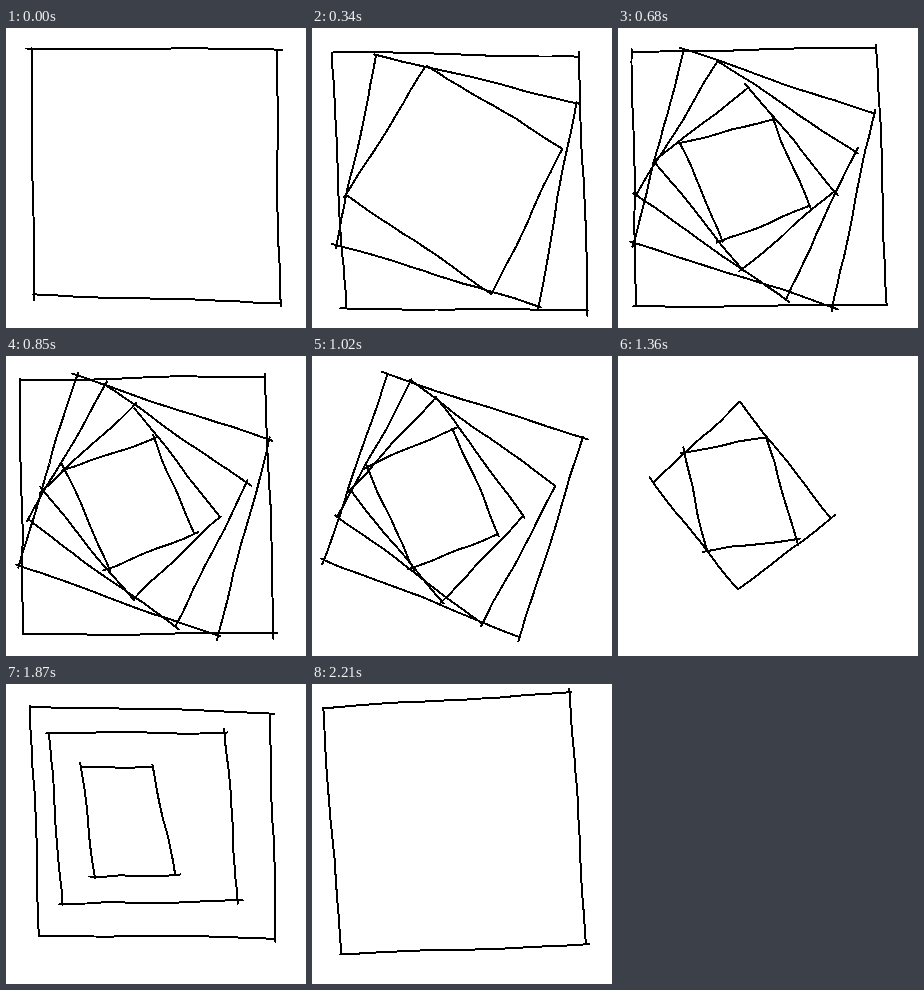
These frames come from a looping animation (300x300 px, 2.38 s). An HTML page:

```html
<!DOCTYPE html>
<html lang="en">
<head>
<meta charset="utf-8">
<title>Nested squares</title>
<style>
  html, body { margin: 0; width: 100%; height: 100%; overflow: hidden; background: #fff; }
  svg { display: block; width: 100%; height: 100%; }
  path { fill: none; stroke: #000; stroke-width: 2; stroke-linecap: round; stroke-linejoin: round; shape-rendering: crispEdges; }
</style>
</head>
<body>
<svg viewBox="0 0 300 300"><path id="ink"/></svg>
<script>
const STEP = 170, STEPS = 14;

// A square lives from its first to its last step. Keys give its corners
// (clockwise from top left) at some steps; the rest is interpolated.
const squares = [
  { first: 0, last: 5, keys: {
    0: [25, 21, 271, 21, 274, 275, 28, 267],
    2: [20, 23, 266, 29, 276, 282, 34, 281],
    4: [14, 25, 259, 20, 268, 277, 18, 279] } },
  { first: 1, last: 6, keys: {
    2: [65, 27, 264, 75, 227, 279, 24, 217],
    4: [66, 21, 256, 86, 215, 279, 15, 215],
    6: [75, 18, 271, 81, 208, 281, 12, 204] } },
  { first: 2, last: 7, keys: {
    2: [114, 38, 250, 120, 180, 266, 34, 167],
    4: [100, 33, 237, 124, 168, 272, 18, 167],
    6: [99, 25, 244, 130, 170, 268, 25, 160] } },
  { first: 3, last: 8, keys: {
    4: [131, 60, 216, 163, 124, 242, 36, 133],
    6: [124, 41, 211, 160, 130, 245, 38, 134],
    8: [122, 46, 213, 162, 120, 233, 35, 126] } },
  { first: 4, last: 11, keys: {
    4: [62, 115, 155, 91, 192, 177, 104, 213],
    6: [55, 111, 141, 74, 186, 178, 101, 211],
    8: [67, 97, 148, 81, 178, 184, 89, 195],
    11: [75, 83, 146, 83, 170, 191, 88, 192] } },
  { first: 10, last: 12, keys: {
    11: [43, 49, 219, 49, 231, 217, 56, 220] } },
  { first: 11, last: 13, keys: {
    11: [24, 23, 263, 29, 270, 254, 33, 252],
    13: [11, 24, 258, 9, 274, 261, 30, 270] } }
];

function randomFrom(seed) {
  return () => {
    seed = (seed * 1664525 + 1013904223) >>> 0;
    return seed / 4294967296;
  };
}

function cornersAt(keys, step) {
  const times = Object.keys(keys).map(Number);
  const before = times.filter(t => t <= step).pop() ?? times[0];
  const after = times.find(t => t >= step) ?? before;
  const mix = after > before ? (step - before) / (after - before) : 0;
  return keys[before].map((v, i) => v + (keys[after][i] - v) * mix);
}

// A pen stroke that slightly over- or undershoots its ends and wavers on the way.
function stroke(x1, y1, x2, y2, random) {
  const length = Math.hypot(x2 - x1, y2 - y1);
  const ux = (x2 - x1) / length, uy = (y2 - y1) / length;
  const from = 2 - random() * 8, to = length - 2 + random() * 8;
  const phase = random() * 2 * Math.PI, bow = random() * 2 - 1;
  const count = Math.ceil(length / 14);
  const points = [];
  for (let i = 0; i <= count; i++) {
    const t = i / count, along = from + (to - from) * t;
    const off = bow * Math.sin(Math.PI * t) + 0.6 * Math.sin(phase + 9 * t) + random() * 0.6 - 0.3;
    points.push((x1 + ux * along - uy * off).toFixed(1) + ',' + (y1 + uy * along + ux * off).toFixed(1));
  }
  return 'M' + points.join(' ');
}

function sketch(step) {
  let path = '';
  squares.forEach(({ first, last, keys }, n) => {
    if (step < first || step > last) return;
    const c = cornersAt(keys, step);
    const random = randomFrom(7919 * (step + 1) + 104729 * (n + 1));
    for (let i = 0; i < 8; i += 2) {
      const j = (i + 2) % 8;
      path += stroke(c[i], c[i + 1], c[j], c[j + 1], random);
    }
  });
  return path;
}

const sketches = Array.from({ length: STEPS }, (_, step) => sketch(step));
const ink = document.getElementById('ink');
const start = performance.now();

function draw(now) {
  const step = Math.floor(Math.max(0, now - start) / STEP) % STEPS;
  ink.setAttribute('d', sketches[step]);
  requestAnimationFrame(draw);
}
draw(start);
</script>
</body>
</html>
```
